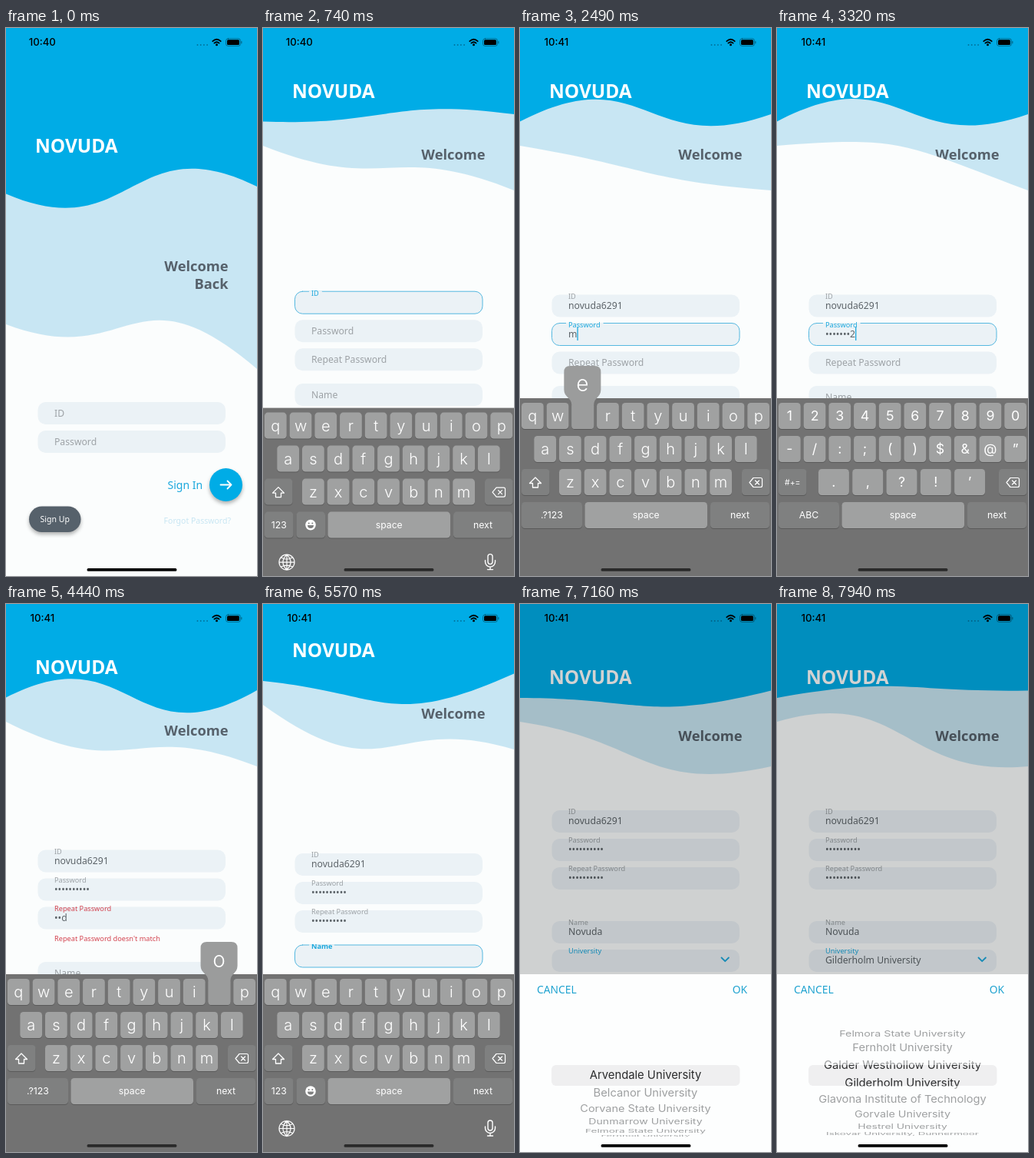
Recreate the animation shown at these times as an HTML page with a canvas. Size 327 by 712 pixels, loop 7990 ms.

```html
<!DOCTYPE html>
<html lang="en">
<head>
<meta charset="utf-8">
<title>Sign up flow</title>
<style>
html, body { margin: 0; height: 100%; overflow: hidden; background: #fbfdfd; }
canvas { display: block; width: 327px; height: 712px; }
</style>
</head>
<body>
<canvas></canvas>
<script>
const W = 327, H = 712, LOOP = 7990;
const BLUE = '#00ace6', PALE = '#c8e6f3', PAGE = '#fbfdfd', FIELD = '#ebf2f6', SLATE = '#56616b',
  LINK = '#1ba8dd', HINT = '#9da2a6', RED = '#d3434f', KEY = '#a0a1a1', KEY_DARK = '#7f8080', BOARD = '#727272';
const NOTO = '"Noto Sans", sans-serif', INTER = 'Inter, sans-serif';
const canvas = document.querySelector('canvas'), c = canvas.getContext('2d');
const dpr = window.devicePixelRatio || 1;
canvas.width = W * dpr;
canvas.height = H * dpr;

const clamp = x => Math.max(0, Math.min(1, x));
const ease = x => (1 - Math.cos(Math.PI * x)) / 2;
const ramp = (t, from, to) => ease(clamp((t - from) / (to - from)));
const mix = (a, b, k) => a.map((v, i) => v + (b[i] - v) * k);
const inside = (t, [from, to]) => t >= from && t < to;

// Vertical positions: title, blue edge, pale edge, welcome, then the five fields
const LOGIN = [153, 215.5, 385, 309, 486, 523, 560, 605, 642];
const FORM = [95, 122, 153, 171.5, 268, 305, 342, 412, 449];
const TYPING = [82, 121.5, 153, 164.5, 346.5, 383.5, 420.5, 465, 502];
const MISMATCH = [82, 121.5, 153, 164.5, 319.5, 356.5, 393.5, 465, 502];
const NAMING = [60, 100, 131, 142.5, 324, 361, 398, 443, 480];
const MOVES = [[160, 480, FORM], [520, 780, TYPING], [4180, 4260, MISMATCH],
  [5010, 5080, TYPING], [5200, 5340, NAMING], [6520, 6650, FORM]];

// Time, then control heights of the blue and the pale wave
const WAVES = [[0, 70, -90, 62, -81], [1650, -83, 50, 68, 95], [3320, -85, 47, -13, -3],
  [4440, -84, 84, 82, -6], [5570, 17, 63, 118, 9], [6490, 24, 61, 80, 110],
  [7940, -29, -7, -47, 73], [LOOP, -29, -7, -47, 73]];

// Typed text with the time of each character
const typed = (...runs) => runs.flatMap(([s, start, step]) => [...s].map((ch, i) => ({ ch, at: start + i * step })));
const FIELDS = [
  { label: 'ID', focus: [540, 2300], keys: typed(['novuda', 950, 110], ['6291', 1740, 110]) },
  { label: 'Password', focus: [2300, 3700], secret: true, keys: typed(['medora', 2420, 110], ['6291', 3180, 110]) },
  { label: 'Repeat Password', focus: [3700, 5200], secret: true, keys: typed(['medora', 4180, 110], ['6291', 4800, 70]) },
  { label: 'Name', focus: [5200, 6520], keys: typed(['Novuda', 5740, 110]) },
  { label: 'University', focus: [6900, LOOP], keys: [] }
];
const SCHOOLS = ['Arvendale University', 'Belcanor University', 'Corvane State University', 'Dunmarrow University',
  'Felmora State University', 'Fernholt University', 'Galder Westhollow University', 'Gilderholm University',
  'Glavona Institute of Technology', 'Gorvale University', 'Hestrel University',
  'Iskovar University, Dunnermoor', 'Jorvelin College'];

// y is the middle of the capital letters
function text(s, x, y, size, color, { font = NOTO, weight = 400, align = 'left' } = {}) {
  c.font = `${weight} ${size}px ${font}`;
  c.textAlign = align;
  c.fillStyle = color;
  c.fillText(s, x, y + size * 0.36);
}
function box(x, y, w, h, r, fill) {
  c.beginPath();
  c.roundRect(x, y, w, h, r);
  c.fillStyle = fill;
  c.fill();
}
function disc(x, y, r, fill) {
  c.beginPath();
  c.arc(x, y, r, 0, 7);
  c.fillStyle = fill;
  c.fill();
}
function line(d, color, width) {
  c.strokeStyle = color;
  c.lineWidth = width;
  c.lineCap = c.lineJoin = 'round';
  c.stroke(new Path2D(d));
}
function shadowed(draw) {
  c.save();
  c.shadowColor = 'rgba(0,0,0,.3)';
  c.shadowBlur = 5 * dpr;
  c.shadowOffsetY = 3 * dpr;
  draw();
  c.restore();
}
function below(y, rise, a, b, fill) {
  c.beginPath();
  c.moveTo(0, y);
  c.bezierCurveTo(W / 2, y + a, W / 2, y + b, W, y + rise);
  c.lineTo(W, H);
  c.lineTo(0, H);
  c.fillStyle = fill;
  c.fill();
}

function waveAt(t) {
  const next = WAVES.findIndex(w => w[0] > t), p = WAVES[next - 1], q = WAVES[next];
  return mix(p, q, ramp(t, p[0], q[0])).slice(1);
}

function drawBackdrop(t, lay) {
  const [a, b, a2, b2] = waveAt(t);
  c.fillStyle = BLUE;
  c.fillRect(0, 0, W, H);
  text('NOVUDA', 38, lay[0], 24.4, '#fff', { weight: 700 });
  below(lay[1], -9.5, a, b, PALE);
  const welcome = { weight: 700, align: 'right' };
  text('Welcome', 289.5, lay[3], 18.3, SLATE, welcome);
  c.globalAlpha = 1 - ramp(t, 120, 320);
  text('Back', 289.5, lay[3] + 23, 18.3, SLATE, welcome);
  c.globalAlpha = 1;
  below(lay[2], 58, a2, b2, PAGE);
}

function drawLogin(t) {
  c.globalAlpha = 1 - ramp(t, 100, 300);
  text('Sign In', 210.5, 594, 14, LINK);
  shadowed(() => disc(286.5, 593.5, 21.5, BLUE));
  line('M279.5 593.5h14M288.5 588.5l5 5-5 5', '#fff', 1.8);
  shadowed(() => box(30, 621.5, 67.5, 33.5, 16.7, SLATE));
  text('Sign Up', 63.7, 638, 10.5, '#fff', { align: 'center', weight: 500 });
  text('Forgot Password?', 293, 640, 10.5, PALE, { align: 'right' });
  c.globalAlpha = 1;
}

function drawField(field, y, t, value) {
  const active = inside(t, field.focus);
  const wrong = field.label === 'Repeat Password' && inside(t, [4180, 5010]);
  const bordered = active && !wrong && field.label !== 'University';
  box(41.5, y, 244.5, 29, 10, FIELD);
  if (bordered) {
    c.strokeStyle = '#55b8e0';
    c.lineWidth = 1;
    c.stroke();
    c.font = `9.2px ${NOTO}`;
    c.fillStyle = FIELD;
    c.fillRect(60, y - 0.7, c.measureText(field.label).width + 7, 1.6);
  }
  if (active || value) {
    const color = wrong ? RED : active ? LINK : HINT;
    text(field.label, 63, y + 2, 9.2, color, { weight: active && field.label === 'Name' ? 600 : 400 });
  } else {
    text(field.label, 63, y + 14.5, 12.2, HINT);
  }
  text(value, 63, y + 13.7, 12.2, '#5d6469');
  if (bordered && inside(t % 700, [300, 600])) {
    c.fillStyle = LINK;
    c.fillRect(63 + c.measureText(value).width, y + 5, 1.3, 17.5);
  }
  if (wrong) text("Repeat Password doesn't match", 63, y + 41, 9.2, RED);
  if (field.label === 'University') line(`M262.5 ${y + 10.5}l4.7 4.7 4.7-4.7`, LINK, 1.8);
}

function valueOf(field, t, school) {
  if (field.label === 'University') return school;
  const done = field.keys.filter(k => k.at <= t);
  return done.map((k, i) => field.secret && (i < done.length - 1 || t - k.at > 280) ? '•' : k.ch).join('');
}

function drawStatus(t) {
  text(t < 2000 ? '10:40' : '10:41', 47.3, 18.5, 13.2, '#000', { font: INTER, weight: 500, align: 'center' });
  for (let i = 0; i < 4; i++) disc(249.5 + i * 4.2, 22, 0.9, 'rgba(0,40,60,.45)');
  line('M269.3 17.2Q274.5 12.4 279.7 17.2M271.4 19.6Q274.5 16.8 277.6 19.6', '#000', 1.8);
  disc(274.5, 21.8, 1.5, '#000');
  c.strokeStyle = 'rgba(0,0,0,.4)';
  c.lineWidth = 0.9;
  c.beginPath();
  c.roundRect(286.5, 13.8, 19, 9.6, 2.8);
  c.stroke();
  box(288, 15.3, 16, 6.6, 1.5, '#000');
  box(306.3, 17, 1.1, 3.2, 0.5, 'rgba(0,0,0,.4)');
}

function drawKey(x, y, w, label, fill, size, weight = 400) {
  box(x, y + 1, w, 34, 4.4, '#5a5a5a');
  box(x, y, w, 34, 4.4, fill);
  text(label, x + w / 2, y + 17, size, '#fff', { font: INTER, align: 'center', weight });
}

function drawPopup(x, label) {
  const l = Math.max(2, Math.min(W - 50, x - 10)), r = x + 28.8;
  c.fillStyle = '#9b9c9c';
  c.fill(new Path2D(`M${l + 8} 439h32q8 0 8 8v23C${l + 48} 480 ${r} 480 ${r} 490V517q0 4-4 4` +
    `H${x + 4}q-4 0-4-4V490C${x} 480 ${l} 480 ${l} 470V447q0-8 8-8z`));
  text(label, l + 24, 462, 28, '#fff', { font: INTER, align: 'center', weight: 300 });
}

function drawKeyboard(t) {
  const up = ramp(t, 520, 780) - ramp(t, 6520, 6650);
  if (up <= 0) return;
  const digits = [[1610, 2300], [3060, 3700], [4750, 5200]].some(span => inside(t, span));
  const plain = t < 2300 || t >= 5200;
  const pressed = FIELDS.flatMap(f => f.keys).find(k => inside(t, [k.at - 75, k.at - 10]));
  const rows = digits ? ['1234567890', '-/:;()$&@”', '.,?!’'] : ['qwertyuiop', 'asdfghjkl', 'zxcvbnm'];
  c.save();
  c.translate(0, 231 * (1 - up));
  c.fillStyle = BOARD;
  c.fillRect(0, 481, W, 231);
  let popup;
  rows.forEach((row, r) => {
    const wide = digits && r === 2, pitch = wide ? 44.3 : 32.7, w = wide ? 40 : 28.8;
    const start = (W - (row.length - 1) * pitch - w) / 2 - (wide ? 1 : 0);
    [...row].forEach((ch, i) => {
      const x = start + i * pitch, y = 487 + 43 * r;
      drawKey(x, y, w, ch, KEY, digits ? 17.8 : 20, digits ? 400 : 300);
      if (r === 0 && pressed && pressed.ch === ch) popup = () => drawPopup(x, ch);
    });
  });
  drawKey(2, 573, 36.5, digits ? '#+=' : '', KEY_DARK, 10.5);
  if (!digits) line('M20 584l7.5 7.5h-4v5.5h-7v-5.5h-4z', '#fff', 1.3);
  drawKey(289, 573, 36.5, '', KEY_DARK, 12);
  line('M299 590.5l5-6h9.5q2 0 2 2v8q0 2-2 2h-9.5zM306.5 588l5 5m0-5l-5 5', '#fff', 1.2);
  drawKey(2, 616, plain ? 37.5 : 79, digits ? 'ABC' : plain ? '123' : '.?123', KEY_DARK, 12.3);
  drawKey(84.5, 616, 159.5, 'space', KEY, 12.2);
  drawKey(248, 616, 77, 'next', KEY_DARK, 12.3);
  if (plain) {
    drawKey(43.5, 616, 37.5, '', KEY_DARK, 12);
    disc(62, 633, 6.8, '#fff');
    disc(59.7, 631, 1, KEY_DARK);
    disc(64.3, 631, 1, KEY_DARK);
    c.beginPath();
    c.arc(62, 633.5, 4, 0, Math.PI);
    c.fill();
    line('M21 681.5a10 10 0 1 0 20 0a10 10 0 1 0-20 0h20M31 671.5v20M31 671.5q-10 10 0 20q10-10 0-20' +
      'M23.5 675.5q7.5 4 15 0M23.5 687.5q7.5-4 15 0', '#fff', 1.2);
    line('M293 674a3 3 0 0 1 6 0v7a3 3 0 0 1-6 0zM289.5 679v2a6.5 6.5 0 0 0 13 0v-2M296 687.5v3.5M292.5 691h7', '#fff', 1.4);
  }
  if (popup) popup();
  c.restore();
}

function drawSchools(position, color) {
  SCHOOLS.forEach((name, i) => {
    const angle = (i - position) * 0.286;
    if (angle < -0.95 || angle > 1.45) return;
    const depth = Math.cos(angle);
    c.save();
    c.translate(W / 2, 612 + 80.5 * Math.sin(angle));
    c.scale(0.86 + 0.14 * depth, depth);
    text(name, 0, 0, 14.8, color, { font: INTER, align: 'center' });
    c.restore();
  });
}

function drawPicker(t, position) {
  const up = ramp(t, 6900, 7130);
  if (!up) return;
  c.fillStyle = `rgba(0,0,0,${0.175 * up})`;
  c.fillRect(0, 0, W, H);
  c.save();
  c.translate(0, 231 * (1 - up));
  c.fillStyle = '#fdfefe';
  c.fillRect(0, 481, W, 231);
  text('CANCEL', 22, 501, 13.8, '#20a3d0');
  text('OK', 296, 501, 13.8, '#20a3d0', { align: 'right' });
  drawSchools(position, '#9d9fa0');
  box(41, 599, 245.5, 27, 6, '#efeff0');
  c.clip();
  drawSchools(position, '#2b2c2d');
  c.restore();
}

function draw(t) {
  let lay = LOGIN;
  for (const [from, to, next] of MOVES) lay = mix(lay, next, ramp(t, from, to));
  const position = 6.65 * ramp(t, 7180, LOOP);
  const school = t > 7180 ? SCHOOLS[Math.round(position)] : '';
  c.setTransform(dpr, 0, 0, dpr, 0, 0);
  drawBackdrop(t, lay);
  FIELDS.forEach((field, i) => {
    c.globalAlpha = i < 2 ? 1 : ramp(t, 180, 420);
    drawField(field, lay[4 + i], t, valueOf(field, t, school));
  });
  c.globalAlpha = 1;
  if (t < 300) drawLogin(t);
  drawPicker(t, position);
  drawStatus(t);
  drawKeyboard(t);
  box(105.5, 702, 117, 3.8, 1.9, inside(t, [700, 6560]) ? '#2a2a2a' : '#000');
}

const began = performance.now();
function tick() {
  draw((performance.now() - began) % LOOP);
  requestAnimationFrame(tick);
}
tick();
</script>
</body>
</html>
```
